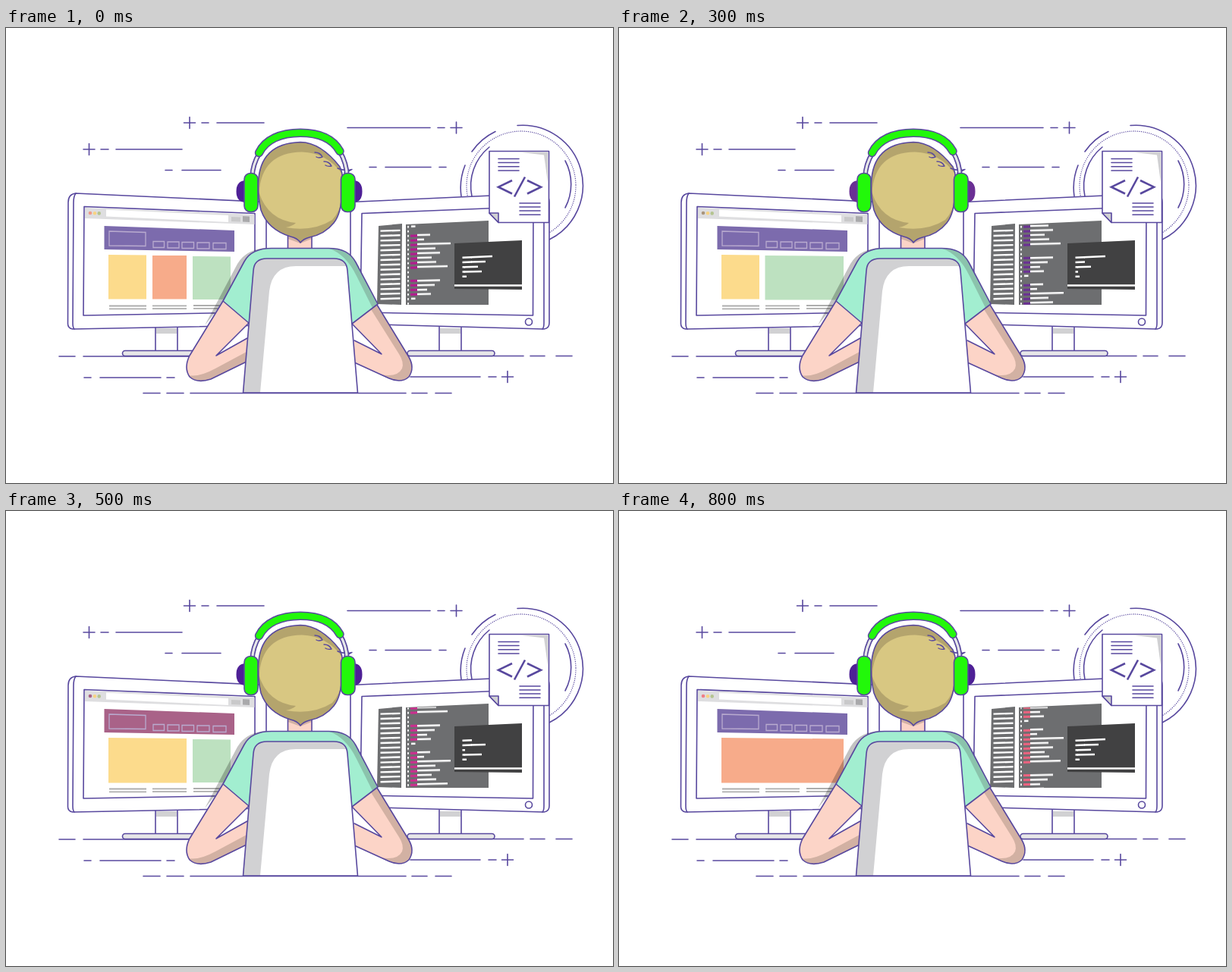
Write an HTML page without scripts that moves like this. It is 800x600 px and loops after 0.9 s.

```html
<!DOCTYPE html>
<html lang="en">
<head>
<meta charset="utf-8">
<title>Developer at work</title>
<style>
  html, body { margin: 0; width: 100%; height: 100%; overflow: hidden; background: #fff; }
  svg { display: block; width: 100%; height: 100%; animation: scene 900ms step-end infinite; }
  .ink { fill: none; stroke: #58489e; stroke-width: 1.6; stroke-linecap: round; stroke-linejoin: round; }
  .ink.paper, .paper { fill: #fff; }
  .ink.base { fill: #e6e6e8; }
  .ink.green { fill: #22f80a; }
  .skin { fill: #fcd4c7; }
  .shade { fill: #d2b1a3; }
  .grey { fill: #d1d1d3; }
  .yellow { fill: #fcdb8c; }
  .salmon { fill: #f7ab8a; }
  .mint { fill: #bde1c0; }
  .panel { fill: #6d6e70; }
  .pad { fill: var(--pad); }
  .head { fill: var(--head); }
  .white { fill: none; stroke: #fff; stroke-width: 2.5; }
  .tag { fill: none; stroke: var(--tag); stroke-width: 3; }
  .three { opacity: var(--three); }
  .right { opacity: var(--right); }
  .left { opacity: var(--left); }
  .one { opacity: var(--one); }
  .odd { opacity: var(--odd); }
  .even { opacity: var(--even); }
  .scroll { animation: scroll 900ms steps(9) infinite; }

  @keyframes scroll { to { transform: translateY(-90px); } }

  /* Colours, card layout and terminal lines change on hard cuts. */
  @keyframes scene {
    0%, 100% { --tag: #b5188f; --head: #7c6bad; --pad: #4e2096; --dot: #ef9a8a;
      --three: 1; --right: 0; --left: 0; --one: 0; --odd: 1; --even: 1; }
    22.222% { --tag: #ee3286; --head: #7c6bad; --pad: #4e2096; --dot: #e8647a;
      --three: 1; --right: 0; --left: 0; --one: 0; --odd: 1; --even: 0; }
    33.333% { --tag: #6a2f94; --head: #7c6bad; --pad: #6a2f94; --dot: #a9957c;
      --three: 0; --right: 1; --left: 0; --one: 0; --odd: 1; --even: 0; }
    44.444% { --tag: #e52d88; --head: #a96288; --pad: #4e2096; --dot: #a96288;
      --three: 0; --right: 1; --left: 0; --one: 0; --odd: 1; --even: 1; }
    55.556% { --tag: #cf2c90; --head: #a96288; --pad: #4e2096; --dot: #a96288;
      --three: 0; --right: 0; --left: 1; --one: 0; --odd: 0; --even: 1; }
    77.778% { --tag: #ef6380; --head: #7c6bad; --pad: #4e2096; --dot: #ef7f88;
      --three: 0; --right: 0; --left: 0; --one: 1; --odd: 1; --even: 1; }
  }
</style>
</head>
<body>
<svg viewBox="0 0 800 600" xmlns="http://www.w3.org/2000/svg">
  <defs>
    <clipPath id="editor"><path d="M527 259.5L636 256V365H527Z"/></clipPath>
    <path id="plus" d="M-7.5 0H7.5M0-7.5V7.5"/>
    <g id="code">
      <path class="white" d="M530 -1.3V94.7" stroke-dasharray="2.5 3.5" style="stroke-width:2"/>
      <path class="tag" d="M533 0h9m-9 6h9m-9 6h9m-9 6h9m-9 18h9m-9 6h9m-9 6h9m-9 6h9m-9 6h9m-9 6h9m-9 6h9m-9 6h9"/>
      <path class="white" d="M542 0H572M542 6H565M542 12H555M542 17.7H560M534 23.5H539.5M542 35H559M542 41H551M542 47H586M542 53H566M542 59H572M542 65H561M542 71H567M542 77H582"/>
    </g>
  </defs>

  <!-- backdrop -->
  <g class="ink">
    <use href="#plus" x="242" y="125"/><use href="#plus" x="109.5" y="160"/>
    <use href="#plus" x="593.5" y="131.5"/><use href="#plus" x="661" y="460"/>
    <path d="M258 125H267M278 125H340M125 160H135M145 160H232M210 187.5H219M232 187.5H283"/>
    <path d="M450 131.5H559M569 131.5H578M479 183.5H488M500 183.5H560M571 183.5H580"/>
    <path d="M70 433H91M102 433H262M525 432.5H682M691 432.5H710M725 432.5H746"/>
    <path d="M103 461H112M124 461H204M212 461H222M533 460H625M636 460H646"/>
    <path d="M181 481.5H203M212 481.5H234M243 481.5H527M535 481.5H555M566 481.5H587"/>
    <path d="M674 128.5A79.5 79.5 0 0 1 716 279M600 222A79.5 79.5 0 0 1 605 181M614 163A79.5 79.5 0 0 1 645 136.5"/>
    <path d="M614 222A66 66 0 0 1 637 157M737 175A66 66 0 0 1 737 237"/>
    <circle cx="679" cy="208" r="72" stroke-dasharray="0.1 2.5" style="stroke-width:1.3"/>
  </g>

  <!-- left monitor -->
  <path class="ink paper" d="M197 390H226V426H197Z"/>
  <path class="grey" d="M198 396H225V403H198Z"/>
  <rect class="ink base" x="153.5" y="425.5" width="110" height="7" rx="3.5"/>
  <path class="ink paper" d="M92 218L343 229.5V392L88 397Q81.5 396 81.5 390L82 230Q82 219 92 218Z"/>
  <path class="ink" d="M92 218Q89 222 89 230L88 389Q88 395 90 397"/>
  <path class="ink paper" d="M103 235.5L328 244.5V375L102 379Z"/>
  <path fill="#dedee0" d="M104 237L327.5 246V259L104 251Z"/>
  <path class="paper" d="M132 239.5L293 247V256L132 248.5Z"/>
  <path fill="#c9c9ca" d="M297 249L309 249.5V255.5L297 255Z"/>
  <path fill="#a9a9ab" d="M312 248L321 248.5V256L312 255.5Z"/>
  <circle cx="111" cy="244" r="2.3" style="fill:var(--dot)"/>
  <circle cx="117" cy="244.2" r="2.3" fill="#f8d382"/>
  <circle cx="122.7" cy="244.4" r="2.3" fill="#b4c490"/>
  <path class="head" d="M129.5 261L301 267V295L129.5 292Z"/>
  <path fill="none" stroke="#b9abcf" stroke-width="1.3" d="M136 268L184 269.5V287.5L136 287ZM194 281.5H208.5V289.5H194ZM213 282H228V290H213ZM232 282.5H247.5V290.5H232ZM252 283H268V291H252ZM273 283.5H290V291.5H273Z"/>
  <g class="three">
    <path class="yellow" d="M135 299L185 299.5V357.5H135Z"/>
    <path class="salmon" d="M193 300H238V357.5H193Z"/>
    <path class="mint" d="M246 301L296 301.5V358H246Z"/>
  </g>
  <g class="right">
    <path class="yellow" d="M135 299L185 299.5V357.5H135Z"/>
    <path class="mint" d="M192.5 300L296 301V358.5H192.5Z"/>
  </g>
  <g class="left">
    <path class="yellow" d="M135 299L238 300V358.5H135Z"/>
    <path class="mint" d="M246 301L296 301.5V358H246Z"/>
  </g>
  <path class="salmon one" d="M135 299L296 300.5V358.5H135Z"/>
  <path fill="none" stroke="#adadad" stroke-width="1.8" d="M136 366.5H185M136 370.3H185M193 366.3H238M193 370.1H238M247 366H296M247 369.8H296"/>

  <!-- right monitor -->
  <path class="ink paper" d="M571 390H600V426H571Z"/>
  <path class="grey" d="M572 396H599V403H572Z"/>
  <rect class="ink base" x="529" y="425.5" width="115" height="7" rx="3.5"/>
  <path class="ink paper" d="M454 229.5L706 218Q716 218 716 230V389Q716 396 709 397L454 390Z"/>
  <path class="ink" d="M706 218Q709 222 709 230V389Q709 395 707 397"/>
  <path class="ink paper" d="M469 244.5L695 235.5L694.5 379L467 375Z"/>
  <circle class="ink" cx="689" cy="387.5" r="4.5"/>
  <path class="panel" d="M491 261L522 258L521 365L489 364Z"/>
  <path class="white" transform="translate(0 13.3) skewY(-1.5)" d="M506.5 266V360" stroke-dasharray="2.4 4" style="stroke-width:26"/>
  <path class="panel" d="M527 259L636 254V365H527Z"/>
  <g clip-path="url(#editor)">
    <g transform="translate(0 12.3) skewY(-1.3)">
      <g class="scroll">
        <use href="#code" y="238"/><use href="#code" y="333.3"/><use href="#code" y="428.6"/>
      </g>
    </g>
  </g>
  <path fill="#414142" d="M591 284L680 280V345L591 344Z"/>
  <path class="white" d="M591 339.5H680M601.5 302.7L614 302.2M601.5 308.9L614 308.5M601.5 315.3H605M601.5 321.5H605M601.5 327.8H607"/>
  <path class="white odd" d="M613 302.2L641 301M604 315.3L622 314.7"/>
  <path class="white even" d="M613 308.5L632 308M604 321.5L627 321"/>

  <!-- document -->
  <path class="ink paper" d="M637 162.5H715.5V256.5H649L637 244Z"/>
  <path class="grey" d="M676 163.5H714.5V207L709 167.5Z"/>
  <path class="ink" style="fill:#d1d1d3" d="M637 244H649V256.5Z"/>
  <path class="ink" d="M649 172.5H676M649 177.5H676M649 182.7H676M649 188H676M677 231H704M677 236H704M677 241H704M677 246.3H704"/>
  <path class="ink" style="stroke-width:2.6;stroke-linecap:butt;stroke-linejoin:miter" d="M667 201L649 209.7L667 218.5M684 196.5L670 222.5M687 201L705 209.7L687 218.5"/>

  <!-- body -->
  <path d="M350 290Q318 289 305 311L262 392L286 362L320 300Z" fill="#000" opacity=".24"/>
  <path class="skin" d="M286 360L242 432Q234 448 242 460Q252 469 270 463L317 440L318 409L277 432L320 389Z"/>
  <path class="shade" d="M240 458Q250 469 270 463L317 440V427L276 449Q254 461 240 458Z"/>
  <path class="ink" d="M286 360L242 432Q234 448 242 460Q252 469 270 463L317 440M318 409L277 432L320 389"/>
  <path class="skin" d="M489 365L531 434Q539 448 531 460Q521 469 505 462L459 441V412L495 430L456 390Z"/>
  <path class="shade" d="M489 365L531 434Q539 448 531 460Q521 469 505 462L494 457Q516 461 522 449Q525 441 518 430L481 371Z"/>
  <path class="ink" d="M489 365L531 434Q539 448 531 460Q521 469 505 462L459 441M459 412L495 430L456 390"/>
  <path class="skin" d="M371.5 274H403V291H371.5Z"/>
  <path class="shade" d="M371.5 274H403V278L388 284L371.5 278Z"/>
  <path class="ink" d="M371.5 274V290M403 274V290"/>
  <path fill="#a2eed0" d="M286 360L314 308C321 295 333 290.5 350 290.5H425C443 290.5 454 296 461 309L490 364L456 390L320 389Z"/>
  <path fill="#8bc3ac" d="M425 290.5C443 290.5 454 296 461 309L490 364L483 369L462 327Q448 298 425 290.5Z"/>
  <path class="ink" d="M320 389L286 360L314 308C321 295 333 290.5 350 290.5H425C443 290.5 454 296 461 309L490 364L456 390"/>

  <!-- chair -->
  <path class="paper" d="M312.5 481L326 320Q327 304 344 304H432Q449 304 450 320L463.5 481Z"/>
  <path class="grey" d="M312.5 481L326 320Q327 304 344 304H432Q447 304 449 314H382Q351 314 347 347L335 481Z"/>
  <path class="ink" d="M312.5 481L326 320Q327 304 344 304H432Q449 304 450 320L463.5 481Z"/>

  <!-- head -->
  <path id="hair" fill="#b4a46d" d="M388 283Q384 277 375 275Q345 266 336 240Q332 224 332.5 205Q334 152 388 150.5Q415 151 440 183Q446 196 443 215Q442 245 432 257Q420 272 400 276Q392 278 388 283Z"/>
  <path fill="#d8c782" d="M333.5 217Q337 164 390 163.5Q424 165 442.5 192V224Q441 241 430 253Q405 269 369 263Q378 261 382 257Q345 253 333.5 217Z"/>
  <use href="#hair" class="ink" style="fill-opacity:0"/>
  <path class="ink" style="stroke-width:1.4" d="M407 164Q414 164 417 170Q412 172 409 170M419 176Q426 176 429 182Q424 183 421 181M437 185Q447 189 456 186.5Q451 190 446 191"/>

  <!-- headphones -->
  <path class="ink" style="stroke-width:6.5" d="M334 165Q325 180 324.5 196M440 163Q449 178 449.5 196"/>
  <path class="ink" style="stroke:#e6e6e8;stroke-width:3.2" d="M334 165Q325 180 324.5 196M440 163Q449 178 449.5 196"/>
  <path id="band" class="ink" style="stroke-width:11.5" d="M333.5 164.5C342 147 362 138.2 388 138.2S431 146 440 162.5"/>
  <path class="ink" style="stroke:#22f80a;stroke-width:8.5" d="M333.5 164.5C342 147 362 138.2 388 138.2S431 146 440 162.5"/>
  <path class="pad" d="M315 201Q303.5 202 303.5 215.5T315 230ZM459 201Q469.5 202 469.5 215.5T459 230Z"/>
  <rect class="ink green" x="314" y="191.5" width="18" height="51" rx="8"/>
  <rect class="ink green" x="441.5" y="191.5" width="18.5" height="51" rx="8"/>
</svg>
</body>
</html>
```
